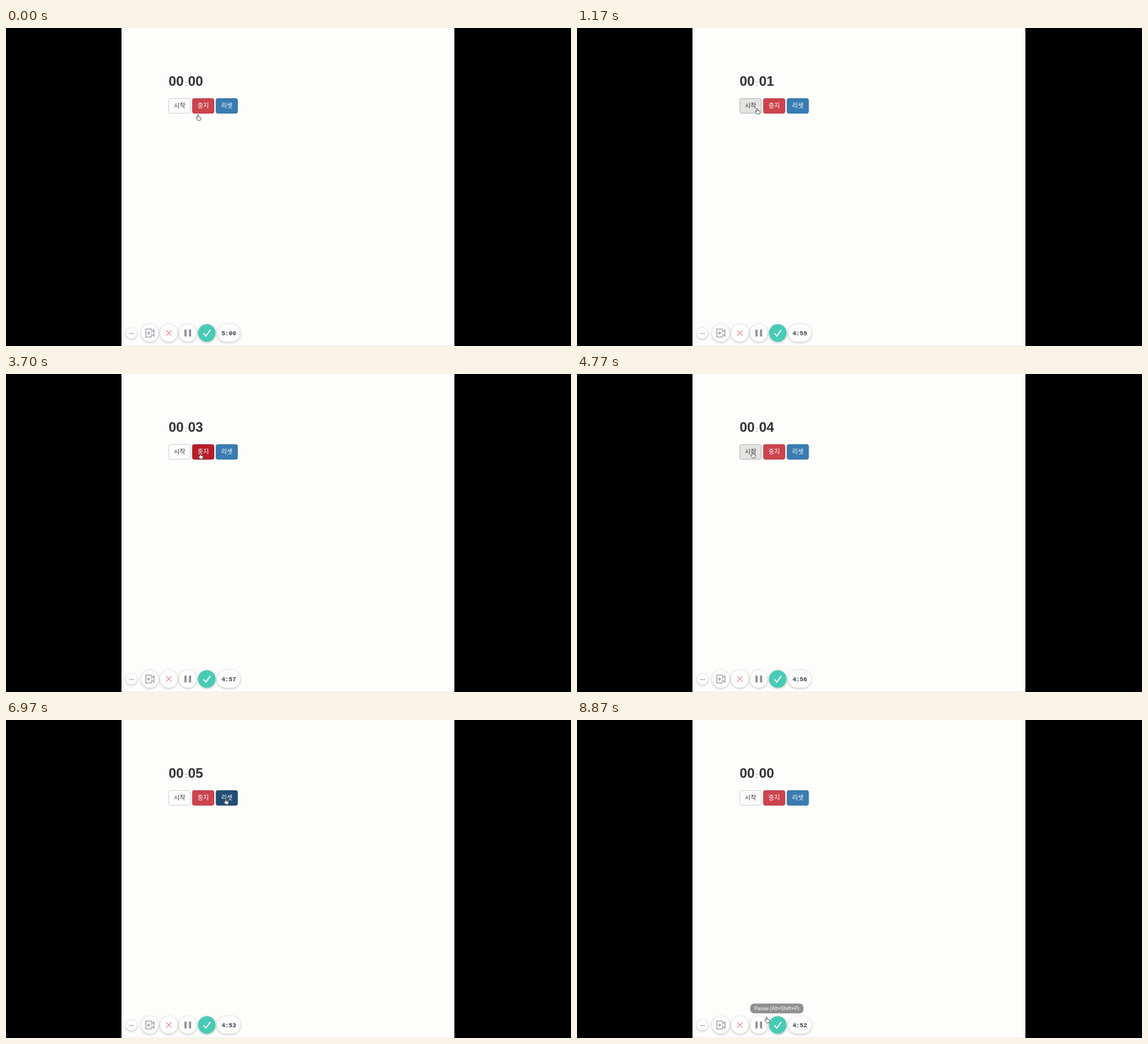
Recreate the animation shown at these times as an HTML page. Size 998 by 561 pixels, loop 8910 ms.

```html
<!DOCTYPE html>
<html lang="ko">
<head>
<meta charset="utf-8">
<title>Stopwatch</title>
<style>
  html, body { margin: 0; width: 100%; height: 100%; overflow: hidden; background: #000; }
  svg { display: block; width: 998px; height: 561px; }
  .digits { font: bold 24px "Liberation Sans", Arial, sans-serif; fill: #333; }
  .colon { font: 12px "Liberation Sans", Arial, sans-serif; fill: #444; text-anchor: middle; }
  .label { font: 500 11px "Noto Sans CJK KR", "Noto Sans CJK", sans-serif; text-anchor: middle; }
  .remain { font: bold 10.8px "Liberation Mono", monospace; fill: #353b4a; text-anchor: middle; }
  .tip { font: 9.1px Roboto, sans-serif; fill: #fff; text-anchor: middle; }
  .float { filter: drop-shadow(0 1px 2px rgba(0, 0, 0, .27)); fill: #fdfdfd; }
  .icon { fill: none; stroke: #8b919c; stroke-width: 1.3; }
</style>
</head>
<body>
<svg viewBox="0 0 998 561">
  <rect width="998" height="561"/>
  <rect x="204" width="588" height="561" fill="#fdfdfc"/>
  <rect x="204" y="560" width="588" height="1" fill="#ececf8"/>

  <text class="digits" x="287.2" y="102">00</text>
  <text class="colon" x="317.8" y="102">:</text>
  <text class="digits" id="seconds" x="321.4" y="102">00</text>
  <g id="buttons"></g>

  <g class="float">
    <circle cx="221.5" cy="538.5" r="9.7"/>
    <circle cx="254" cy="538" r="15.4"/>
    <circle cx="287.6" cy="538" r="15.4"/>
    <circle cx="321.1" cy="538" r="15.4"/>
    <circle cx="354.7" cy="538" r="15.4" fill="#48cbb6"/>
    <rect x="373.3" y="522.6" width="40.6" height="30.8" rx="15.4"/>
  </g>
  <g fill="#444">
    <circle cx="218.4" cy="539" r=".8"/><circle cx="221.5" cy="539" r=".8"/><circle cx="224.6" cy="539" r=".8"/>
  </g>
  <path class="icon" d="M256.6 534.5V531.2H247V545.2H256.6V541.8M249 538.2H255M252 535.2V541.2M256.6 537L261.3 532.6V543.8L256.6 539.4"/>
  <path class="icon" style="stroke:#e48e92" d="M282.8 533.2L292.4 542.8M292.4 533.2L282.8 542.8"/>
  <path fill="#8b8f9a" d="M315.2 532h3.7v12.2h-3.7zM323.3 532h3.7v12.2h-3.7z"/>
  <path fill="none" stroke="#fff" stroke-width="1.9" d="M348.8 538.6L352.9 543.4L361 532.6"/>
  <text class="remain" id="remain" x="393.6" y="542">5:00</text>

  <g id="tooltip">
    <rect x="306" y="500.3" width="94" height="17.2" rx="7" fill="#8f8f8f"/>
    <text class="tip" x="353" y="512.2">Pause (Alt+Shift+P)</text>
  </g>

  <g id="cursor" stroke-linejoin="round">
    <path id="hand" fill="#fff" stroke="#2b2b2b" stroke-width=".85"
      d="M-.9 5.4V.7a.9 .9 0 0 1 1.8 0V3.5l3.5 .8q1.1 .3 .9 1.5l-.5 2.5-.6 1.6h-4.3L-2.9 6.3q-.7-1.2 .4-1.4z"/>
    <path id="arrow" fill="#111" stroke="#fff" stroke-width=".6"
      d="M0 0V7.4L1.7 5.9L2.9 8.7L4.2 8.1L3 5.4H5.1z"/>
  </g>
</svg>
<script>
const LOOP = 8910;
const TICKS = [1170, 2170, 3170, 4770, 5770];
const RESET_AT = 7000;
const FIRST_SECOND = 965;

// Pointer tip: [time, x, y]
const PATH = [
  [530, 339, 153], [950, 318, 142],
  [3250, 318, 142], [3600, 343, 140],
  [4270, 343, 140], [4600, 310, 138],
  [5780, 310, 138], [6080, 342, 137],
  [6500, 342, 137], [6820, 388, 139],
  [7800, 388, 139], [8000, 561, 53.5],
  [8070, 561, 53.5], [8600, 341, 528],
  [8700, 341, 528], [8840, 335, 524.3]
];

const BUTTONS = [
  { x: 287.5, label: '시작', ink: '#333', idle: '#fdfdfc', hover: '#e3e3e1', active: '#e3e3e1',
    edge: '#cccccb', hoverEdge: '#b0b0ae', clicks: [] },
  { x: 329.3, label: '중지', ink: '#fff', idle: '#cb434d', hover: '#b81d2a', active: '#981b24',
    edge: '#bd3943', hoverEdge: '#951b24', clicks: [[3830, 3960], [6110, 6270]] },
  { x: 371, label: '리셋', ink: '#fff', idle: '#397cb2', hover: '#2a628f', active: '#204d74',
    edge: '#336fa1', hoverEdge: '#204d74', clicks: [[6970, 7090]] }
];
const TOP = 124.4, WIDTH = 38, HEIGHT = 26;

const $ = id => document.getElementById(id);
const clamp = v => Math.max(0, Math.min(1, v));
const ease = p => p * p * (3 - 2 * p);

function make(tag, parent, attrs) {
  const el = document.createElementNS('http://www.w3.org/2000/svg', tag);
  for (const key in attrs) el.setAttribute(key, attrs[key]);
  return parent.appendChild(el);
}

for (const b of BUTTONS) {
  b.rect = make('rect', $('buttons'), { x: b.x, y: TOP, width: WIDTH, height: HEIGHT, rx: 3 });
  make('text', $('buttons'), { class: 'label', x: b.x + WIDTH / 2, y: 141.3, fill: b.ink })
    .textContent = b.label;
}

function pointerAt(t) {
  const next = PATH.findIndex(p => p[0] > t);
  if (next === 0) return PATH[0].slice(1);
  if (next < 0) return PATH[PATH.length - 1].slice(1);
  const [t0, x0, y0] = PATH[next - 1], [t1, x1, y1] = PATH[next];
  const p = ease((t - t0) / (t1 - t0));
  return [x0 + (x1 - x0) * p, y0 + (y1 - y0) * p];
}

function draw(t) {
  const [x, y] = pointerAt(t);
  for (const b of BUTTONS) {
    const over = x >= b.x && x <= b.x + WIDTH && y >= TOP && y <= TOP + HEIGHT;
    const down = b.clicks.some(([from, to]) => t >= from && t < to);
    b.rect.setAttribute('fill', down ? b.active : over ? b.hover : b.idle);
    b.rect.setAttribute('stroke', over ? b.hoverEdge : b.edge);
  }

  const count = t < RESET_AT ? TICKS.filter(tick => t >= tick).length : 0;
  $('seconds').textContent = '0' + count;
  const left = 300 - Math.max(0, Math.floor((t - FIRST_SECOND) / 1000) + 1);
  $('remain').textContent = Math.floor(left / 60) + ':' + String(left % 60).padStart(2, '0');

  const pointing = t < 7840 || t > 8540;
  $('hand').style.display = pointing ? '' : 'none';
  $('arrow').style.display = pointing ? 'none' : '';
  $('cursor').setAttribute('transform', `translate(${x.toFixed(2)} ${y.toFixed(2)})`);
  $('tooltip').setAttribute('opacity', clamp((t - 8690) / 150));
}

const start = performance.now();
function frame() {
  draw((performance.now() - start) % LOOP);
  requestAnimationFrame(frame);
}
frame();
</script>
</body>
</html>
```
